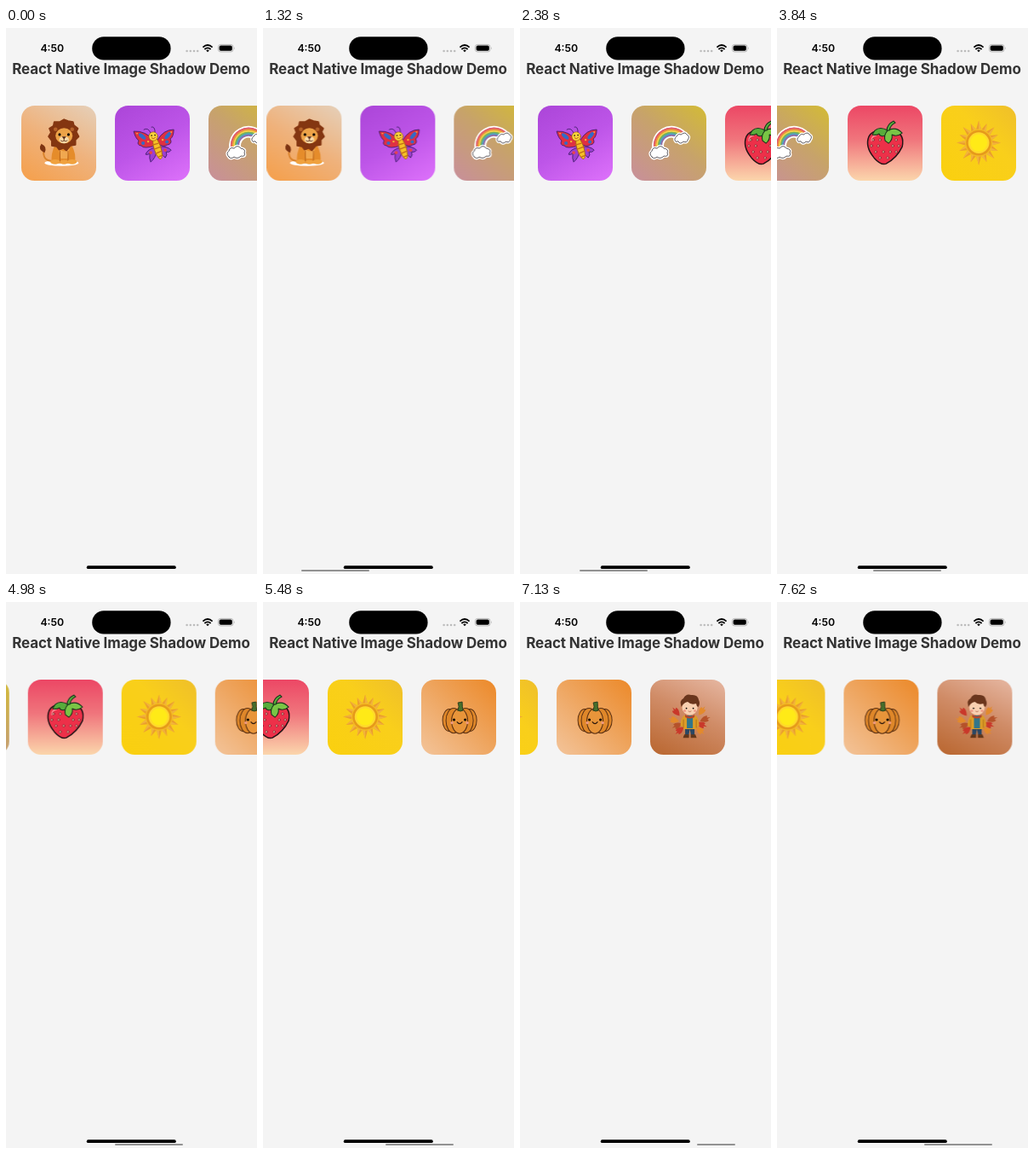
An HTML page that plays this animation: 295 px wide and 640 px high, repeating every 8000 ms.

```html
<!DOCTYPE html>
<html lang="en">
<head>
<meta charset="utf-8">
<title>Card carousel</title>
<style>
  html, body { margin: 0; width: 100%; height: 100%; overflow: hidden; background: #f4f4f4; }
  body { position: relative; font-family: Inter, "Liberation Sans", sans-serif; }
  #chrome { position: absolute; left: 0; top: 0; }
  #track { position: absolute; left: 18px; top: 90.5px; display: flex; gap: 21.8px; will-change: transform; }
  .card { flex: none; width: 88.2px; height: 88.2px; border-radius: 15.5px; stroke-linecap: round; stroke-linejoin: round; }
  #bar { position: absolute; top: 635px; height: 2.3px; border-radius: 1.2px; background: #929292; }
</style>
</head>
<body>
<svg id="chrome" width="295" height="640">
  <text x="54.3" y="28.3" text-anchor="middle" font-size="12.3" font-weight="600">4:50</text>
  <rect x="101.2" y="10.2" width="92.4" height="27.4" rx="13.7"/>
  <g fill="#bdbdbd">
    <circle cx="212.6" cy="27" r="1.3"/><circle cx="216.8" cy="27" r="1.3"/>
    <circle cx="221" cy="27" r="1.3"/><circle cx="225.2" cy="27" r="1.3"/>
  </g>
  <g fill="none" stroke="#000" stroke-width="1.8">
    <path d="M231.4 22.6Q237 17.4 242.6 22.6M233.4 25Q237 21.7 240.6 25"/>
    <path d="M235.2 26.3Q237 24.8 238.8 26.3L237 28.2Z" fill="#000" stroke="none"/>
  </g>
  <rect x="249.4" y="19.4" width="17.6" height="8.6" rx="2.8" fill="none" stroke="#aaa" stroke-width=".8"/>
  <rect x="250.6" y="20.6" width="15.2" height="6.2" rx="1.8"/>
  <path d="M268 22.2q1.4 1.5 0 3z" fill="#aaa"/>
  <text x="147" y="53.6" text-anchor="middle" font-size="17" font-weight="700" letter-spacing="-.13" fill="#333">React Native Image Shadow Demo</text>
  <rect x="94.8" y="630.3" width="105" height="3.7" rx="1.85"/>
</svg>

<div id="track">
  <!-- lion -->
  <svg class="card" viewBox="0 0 88 88" style="background:linear-gradient(30deg,#f59f4a,#efb27c 50%,#e5d0ba)">
    <g transform="translate(4.5 2) scale(.95)">
      <ellipse cx="45" cy="68.5" rx="21" ry="3.6" fill="#fff"/>
      <path d="M36 66Q21 67 23 53" fill="none" stroke="#d9822b" stroke-width="2"/>
      <path d="M24 56Q15 52 20 45Q28 49 24 56Z" fill="#7d3412"/>
      <path d="M37 46Q31 58 33 69H61Q64 58 57 46Z" fill="#e58c2b"/>
      <path d="M41 50Q48 58 55 50L52 63H44Z" fill="#f0a850"/>
      <path d="M43 54V67M53 54V67" stroke="#b8651c"/>
      <g fill="#f0a23f"><ellipse cx="37" cy="67" rx="6" ry="3"/><ellipse cx="58" cy="67" rx="6" ry="3"/><ellipse cx="48" cy="67.5" rx="5" ry="2.6"/></g>
      <path d="M48 15L53 17L59 18L60 22L65 26L63 30L66 36L62 40L62 46L56 47L51 53L47 50L42 52L39 48L33 47L33 41L29 36L32 31L30 26L35 23L36 18L43 18Z" fill="#843611" stroke="#843611" stroke-width="2"/>
      <g fill="#b5622a"><circle cx="37.5" cy="27" r="2.4"/><circle cx="58" cy="27" r="2.4"/></g>
      <ellipse cx="48" cy="35" rx="10.5" ry="9.5" fill="#eda348"/>
      <ellipse cx="48" cy="40" rx="6" ry="4.4" fill="#f9d9a7"/>
      <path d="M45.3 36H50.7L48 39.3Z" fill="#4f2312"/>
      <path d="M48 39V41Q46 43 44 41M48 41Q50 43 52 41" fill="none" stroke="#4f2312" stroke-width=".8"/>
      <circle cx="42.5" cy="33.5" r="1.6"/><circle cx="53.5" cy="33.5" r="1.6"/>
    </g>
  </svg>

  <!-- butterfly -->
  <svg class="card" viewBox="0 0 88 88" style="background:linear-gradient(150deg,#ab45d8,#bd55e8 50%,#de72fb)">
    <g stroke="#43206e" stroke-width=".9">
      <path d="M46 41Q36 29 22 30Q24 38 28 41Q25 46 31 47Q34 51 47 47Z" fill="#df3042"/>
      <path d="M50 40Q57 28 69 28Q69 36 65 39Q68 45 61 46Q57 49 51 45Z" fill="#df3042"/>
      <path d="M47 49Q38 51 36 57Q38 58 41 56Q40 62 42 66Q48 61 49 53Z" fill="#9b3fd0"/>
      <path d="M52 48Q61 47 66 52Q64 55 60 54Q62 58 59 61Q54 58 53 52Z" fill="#9b3fd0"/>
    </g>
    <g fill="#316bc9">
      <ellipse cx="32" cy="36" rx="5" ry="2.2" transform="rotate(38 32 36)"/>
      <ellipse cx="62" cy="35" rx="5" ry="2.2" transform="rotate(-50 62 35)"/>
      <circle cx="33" cy="44" r="2"/><circle cx="61" cy="42.5" r="2"/>
    </g>
    <g fill="#e8434d"><circle cx="42" cy="55" r="1.9"/><circle cx="59" cy="52" r="1.9"/></g>
    <g fill="#f5b33a"><circle cx="26" cy="32.5" r=".9"/><circle cx="66" cy="31" r=".9"/><circle cx="39" cy="42" r="1.2"/><circle cx="56" cy="40" r="1.2"/></g>
    <path d="M42 32Q39 25 34 28M47 31Q47 24 43 25" fill="none" stroke="#43206e" stroke-width=".9"/>
    <ellipse cx="50" cy="50" rx="4" ry="13" transform="rotate(-17 50 50)" fill="#f6c125" stroke="#9b5b12" stroke-width=".7"/>
    <path d="M44 46L51 44M46 51L54 48M48 56L55 53M51 60L56 58" stroke="#c36d18" stroke-width="1.3"/>
    <circle cx="45" cy="36" r="5.2" fill="#fbd43b" stroke="#9b5b12" stroke-width=".7"/>
    <circle cx="43" cy="35" r=".8"/><circle cx="47" cy="34.5" r=".8"/>
    <path d="M43 37.5Q45.5 40 47.5 37" fill="none" stroke="#a03c1b" stroke-width=".8"/>
  </svg>

  <!-- rainbow -->
  <svg class="card" viewBox="0 0 88 88" style="background:linear-gradient(40deg,#c88f9b,#c7a36a 55%,#d3bb35)">
    <g id="bows" fill="none" transform="rotate(-30 46 45)"></g>
    <g id="clouds" fill="#fff"></g>
  </svg>

  <!-- strawberry -->
  <svg class="card" viewBox="0 0 88 88" style="background:linear-gradient(#ec4765,#f0757c 45%,#fbd6ac)">
    <path d="M44 32Q31 26 25 36Q20 48 31 61Q39 70 45 68Q58 61 64 48Q67 34 56 30Q48 28 44 32Z" fill="#ed3049" stroke="#241416" stroke-width="1.5"/>
    <path d="M28 41Q28 36 33 35" fill="none" stroke="#ff8b94" stroke-width="1.6"/>
    <g id="seeds" fill="#ffe9b8" stroke="#7a142a" stroke-width=".7"></g>
    <g fill="#57ad3b" stroke="#18351b" stroke-width="1.1">
      <path d="M47 29Q38 24 32 29L29 34Q34 35 37 33Q38 37 45 35Z"/>
      <path d="M47 29Q42 34 44 41L48 44Q53 40 52 34Q58 37 64 32Q57 24 47 29Z" fill="#79c545"/>
      <path d="M46 29Q46 22 54 18L56 20Q50 23 49 29Z"/>
    </g>
  </svg>

  <!-- sun -->
  <svg class="card" viewBox="0 0 88 88" style="background:linear-gradient(45deg,#fad00f,#f9cf1b 60%,#efbf2b)">
    <g id="rays"></g>
    <circle cx="44" cy="43.5" r="16" fill="#f5bd22"/>
    <circle cx="44" cy="43.5" r="13.6" fill="#ffd92c" stroke="#e69a1b" stroke-width="2.6"/>
    <circle cx="44" cy="43.5" r="10" fill="#ffea17"/>
  </svg>

  <!-- pumpkin -->
  <svg class="card" viewBox="0 0 88 88" style="background:linear-gradient(45deg,#f3c49a,#eea35b 55%,#ec8929)">
    <g fill="#df8729" stroke="#5a3013" stroke-width="1">
      <ellipse cx="33" cy="47.5" rx="8" ry="13"/><ellipse cx="57" cy="47.5" rx="8" ry="13"/>
      <ellipse cx="38" cy="48" rx="9" ry="14.5"/><ellipse cx="52" cy="48" rx="9" ry="14.5"/>
      <ellipse cx="45" cy="48.5" rx="9.5" ry="14.5" fill="#e8953a"/>
    </g>
    <path d="M43 36Q45 31 43 27L48 26Q48 32 49 36Q46 38 43 36Z" fill="#47702c" stroke="#26391c" stroke-width=".9"/>
    <circle cx="38.5" cy="47" r="1.5"/><circle cx="51.5" cy="47" r="1.5"/>
    <g fill="#ef9a83"><circle cx="36" cy="50.5" r="1.7"/><circle cx="54" cy="50.5" r="1.7"/></g>
    <path d="M42 49.5Q45 53.5 48 49.5" fill="none" stroke="#2b170c" stroke-width="1.1"/>
  </svg>

  <!-- child in autumn leaves -->
  <svg class="card" viewBox="0 0 88 88" style="background:linear-gradient(25deg,#b9662f,#d08c67 55%,#e6b7a2)">
    <g id="leaves"></g>
    <path d="M41 54H52V66H48L46.5 58L45 66H41Z" fill="#2a4763"/>
    <path d="M40 64H45.5V68H38.5ZM47.5 64H53L54.5 68H47.5Z" fill="#633619"/>
    <path d="M40 42Q36 44 35.5 54L39 56V58H54V56L57.5 54Q57 44 53 42Z" fill="#dc9c27"/>
    <path d="M43 42H50V57H43Z" fill="#30768b"/>
    <path d="M39 47V56M54 47V56" stroke="#a86b18" stroke-width=".8"/>
    <path d="M41 41Q46.5 45 52 41V44Q46.5 47 41 44Z" fill="#b6472c"/>
    <ellipse cx="46.5" cy="33" rx="9" ry="8.3" fill="#f8d0b1"/>
    <path d="M36.5 32Q34 24 39 22Q42 16 48 18Q56 17 57 24Q59 28 56.5 32Q54 31 54 28Q48 30 44 26Q39 27 36.5 32Z" fill="#6a361d"/>
    <circle cx="42.5" cy="33.5" r=".9"/><circle cx="50.5" cy="33.5" r=".9"/>
    <g fill="#ef9b87"><circle cx="40.5" cy="36.5" r="1.5"/><circle cx="52.5" cy="36.5" r="1.5"/></g>
    <path d="M45 37Q46.5 38.5 48 37" fill="none" stroke="#a4543a" stroke-width=".7"/>
  </svg>
</div>
<div id="bar"></div>

<script>
const LOOP = 8000, MAX_SCROLL = 490;
const el = id => document.getElementById(id);
const fill = (id, list, draw) => { el(id).innerHTML = list.map(draw).join(''); };

fill('bows', ['#fff', '#e2566c', '#ee8f3c', '#f5d548', '#74b45a', '#4ba0c4', '#8f68ac', '#fff'], (color, i) => {
  const r = 22 - i * 1.7;
  return `<path d="M${46 - r} 47A${r} ${r} 0 0 1 ${46 + r} 47" stroke="${color}" stroke-width="1.8"/>`;
});

// White sticker edge first, then the dark outline
const cloudShapes = 'M24 60Q20 56 24 53Q25 48 30 50Q34 45 38 50Q44 51 42 55Q44 60 38 59Q34 63 30 60Q26 63 24 60Z'
  + 'M52 42Q49 39 53 36Q55 32 58 34Q63 30 65 34Q69 36 66 40Q65 44 61 42Q57 46 55 42Z';
fill('clouds', [['#fff', 3.6], ['#36323a', 0.8]], ([stroke, width]) =>
  `<path d="${cloudShapes}" stroke="${stroke}" stroke-width="${width}"/>`);

const seedRows = [[40, 30, 38, 57], [47, 28, 36, 53, 60], [54, 33, 42, 50, 57], [61, 38, 47]];
fill('seeds', seedRows.flatMap(([y, ...xs]) => xs.map(x => [x, y])),
  ([x, y]) => `<ellipse cx="${x}" cy="${y}" rx="1.1" ry="1.6"/>`);

fill('rays', [...Array(16).keys()], i => {
  const tip = i % 2 ? 19 : 17.5;
  return `<g transform="rotate(${i * 22.5} 44 43.5)">
    <path d="M40.8 28.5L44 ${tip}L47.2 28.5Z" fill="#eb9d2e"/>
    <path d="M44 28.5V${tip}L47.2 28.5Z" fill="#f2b43c"/></g>`;
});

const leaves = [[30, 37, -40], [27, 47, -75], [31, 54, -115], [34, 60, -130],
                [61, 36, 35], [65, 46, 70], [61, 53, 110], [59, 60, 130]];
fill('leaves', leaves, ([x, y, angle], i) =>
  `<path d="M0 7Q-5 1 -3 -3L-1 -2L0 -6L1 -2L3 -3Q5 1 0 7Z" transform="translate(${x} ${y}) rotate(${angle})"
    fill="${['#c9382a', '#e38a2c', '#b5522a'][i % 3]}"/>`);

// Each scroll: start, end, number of held steps, target offset, ease-out power
const scrolls = [
  [1320, 2380, 11, 107, 1.43],
  [3400, 3840, 5, 265, 2],
  [4860, 5480, 7, 382, 2],
  [6400, 6940, 6, 530, 7.6],
  [7130, 7130, 1, 525, 1],
  [7250, 7470, 3, 491, 1.6],
  [7620, 7620, 1, 489.6, 1],
];

function offsetAt(time) {
  let offset = 0;
  for (const [start, end, steps, target, power] of scrolls) {
    if (time < start) break;
    const interval = (end - start) / (steps - 1) || 1;
    const step = Math.min(steps, Math.floor((time - start) / interval + 0.001) + 1);
    offset += (target - offset) * (1 - (1 - step / steps) ** power);
  }
  return offset;
}

function render(now) {
  const time = now % LOOP;
  const offset = offsetAt(time);
  const squeeze = Math.max(0, offset - MAX_SCROLL);
  el('track').style.transform = `translateX(${-offset}px)`;
  const bar = el('bar').style;
  bar.display = time < scrolls[0][0] ? 'none' : 'block';
  bar.left = 41 + 0.27 * Math.min(offset, MAX_SCROLL) + squeeze + 'px';
  bar.width = 80 - squeeze + 'px';
}

const origin = performance.now();
function tick() {
  render(performance.now() - origin);
  requestAnimationFrame(tick);
}
tick();
</script>
</body>
</html>
```
